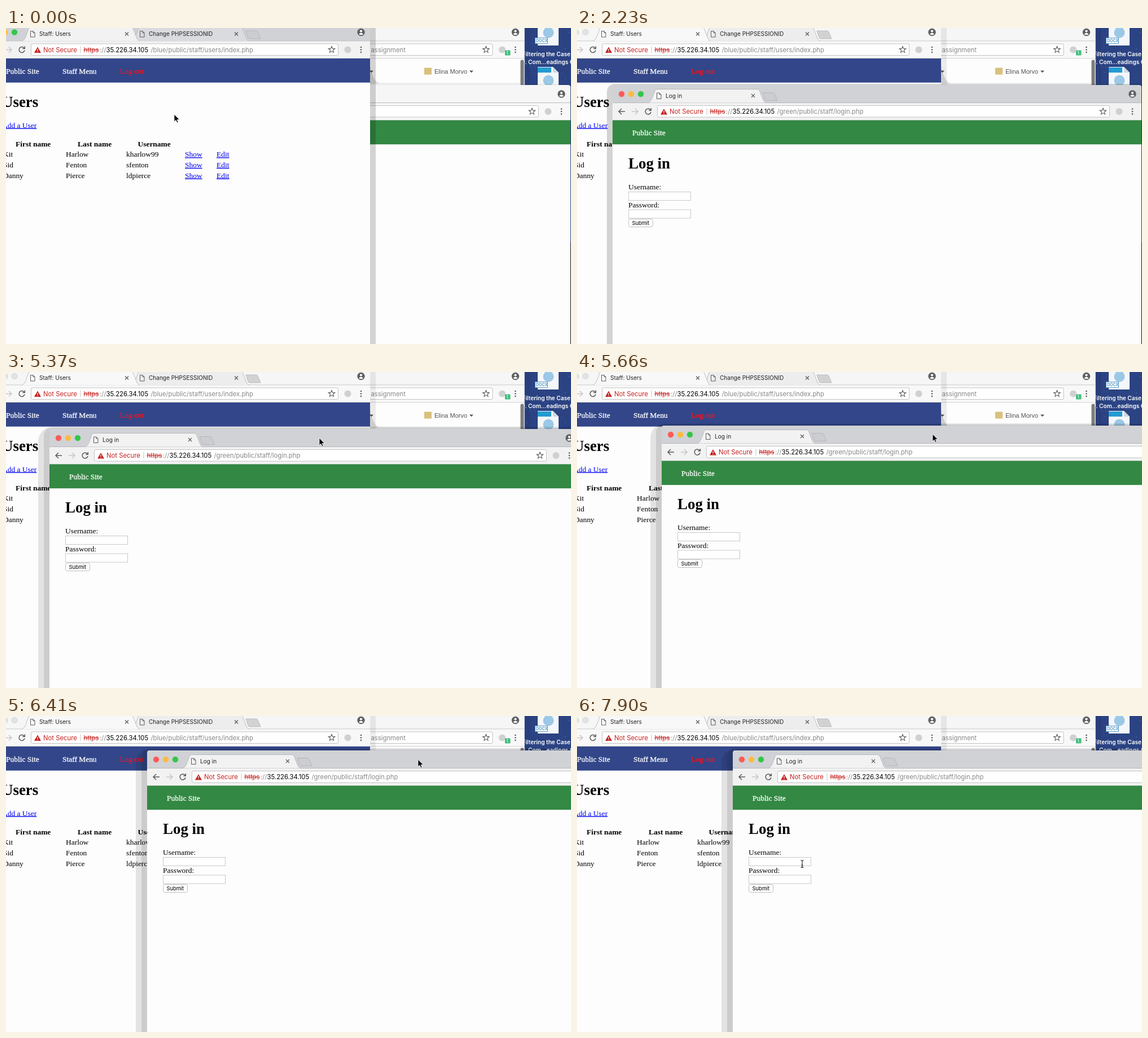
These frames come from a looping animation (1001x560 px, 8 s). An HTML page:

```html
<!DOCTYPE html>
<html lang="en">
<head>
<meta charset="utf-8">
<title>Log in</title>
<style>
html, body { margin: 0; width: 100%; height: 100%; overflow: hidden; }
#stage { position: relative; width: 1001px; height: 560px; overflow: hidden; background: #2b4383; }
svg { position: absolute; left: 0; top: 0; overflow: visible; }
text { white-space: pre; }
.ui { font: 11.3px Inter, sans-serif; }
.tab { font: 10.05px Inter, sans-serif; fill: #222; }
.page { font: 13.45px "Liberation Serif", serif; }
.head { font: bold 26.9px "Liberation Serif", serif; }
.th { font: bold 13.45px "Liberation Serif", serif; }
.nav { fill: #fff; stroke: #fff; stroke-width: .3px; }
.out { fill: #ff1018; stroke: #ff1018; }
.link { fill: #00e; text-decoration: underline; }
.btn { font: 9.3px Inter, sans-serif; }
.label { font: 600 10.1px Inter, sans-serif; fill: #fff; }
.account { font: 11px "Liberation Sans", sans-serif; fill: #555; }
.line { fill: none; stroke: #5a5a5a; stroke-width: 1.5; }
.dim { stroke: #c6c6c6; }
.grey { fill: #888; }
.red { fill: #c5221f; }
.strip { fill: #f6f6f6; }
.bar, .front { fill: #f8f8f8; }
.back { fill: #ededed; }
.edge { stroke: #b4b5b8; stroke-width: .9; }
.plus { fill: #d2d2d2; }
.light { fill: #e2e2e2; stroke: #cfcfcf; stroke-width: .7; }
.shade { fill: #000; opacity: .07; }
.wide { fill: #000; opacity: 0; }
.near { z-index: 2; }
.on { z-index: 3; }
.on .strip { fill: #d0d2d6; }
.on .bar, .on .front { fill: #f2f2f3; }
.on .back { fill: #dadbde; }
.on .plus { fill: #cbcdd0; }
.on .light { stroke: none; }
.on .l0 { fill: #fc5b57; }
.on .l1 { fill: #fdbb3f; }
.on .l2 { fill: #34c648; }
.on .shade { opacity: .17; }
.moved .shade { opacity: .1; }
.moved .wide { opacity: .1; }
#pointer { z-index: 4; }
</style>
</head>
<body>
<div id="stage"></div>
<script>
const stage = document.getElementById('stage');
const text = (x, y, s, cls) => `<text x="${x}" y="${y}" class="${cls}">${s}</text>`;
const rect = (x, y, w, h, attrs) => `<rect x="${x}" y="${y}" width="${w}" height="${h}" ${attrs}/>`;
const shape = (d, attrs) => `<path d="${d}" ${attrs}/>`;
const disc = (x, y, r, attrs) => `<circle cx="${x}" cy="${y}" r="${r}" ${attrs}/>`;
const at = (x, y, s) => `<g transform="translate(${x} ${y})">${s}</g>`;

function layer(body, cls = '') {
  const el = document.createElementNS('http://www.w3.org/2000/svg', 'svg');
  el.setAttribute('width', 1001);
  el.setAttribute('height', 560);
  el.setAttribute('class', cls);
  el.innerHTML = body;
  stage.append(el);
  return el;
}

const place = (el, x, y) => { el.style.transform = `translate(${x}px, ${y}px)`; };

function star(x, y) {
  let d = '';
  for (let i = 0; i < 10; i++) {
    const r = i % 2 ? 2.6 : 6, a = i * Math.PI / 5;
    d += `${i ? 'L' : 'M'}${(x + r * Math.sin(a)).toFixed(2)} ${(y - r * Math.cos(a)).toFixed(2)}`;
  }
  return shape(d + 'Z', 'class="line" style="stroke-width:1.1"');
}

function tab(x, title, cls) {
  return at(x, 0,
    shape('M-31 31.5C-26 30-25 27-19 10Q-17.5 7.5-15 7.5H162Q165 7.5 166.5 10C173 27 173 30 178 31.5', `class="edge ${cls}"`) +
    shape('M-15.5 14h4.5l3 3v7.5h-7.5zM-11 14v3h3', 'class="line" style="stroke-width:1"') +
    text(0, 22.7, title, 'tab') +
    shape('M152 16l6 6m0-6l-6 6', 'class="line" style="stroke-width:1.2"'));
}

function address(url) {
  return shape('M85 52.5l6-10.5 6 10.5z', 'class="red"') +
    shape('M91 45.5v3.5m0 1.1v1.2', 'stroke="#fff" stroke-width="1.2"') +
    text(101, 51, 'Not Secure', 'ui red') +
    rect(166.5, 41, 1, 12, 'fill="#c4c4c4"') +
    `<text y="51" class="ui"><tspan x="172.5" class="red" text-decoration="line-through">https</tspan>` +
    `<tspan x="201" class="grey">://</tspan><tspan x="212.5">35.226.34.105</tspan>` +
    `<tspan x="291.5" class="grey">${url}</tspan></text>`;
}

// Browser window drawn from its own top left corner.
function browser(w, tabs, url, page, cls) {
  const last = 94 + 194 * (tabs.length - 1);
  return layer(
    rect(-20, -4, w + 40, 700, 'rx="26" class="wide"') +
    rect(-10, -2, w + 20, 700, 'rx="14" class="shade"') +
    shape(`M0 640V4.5Q0 0 4.5 0H${w - 4.5}Q${w} 0 ${w} 4.5V640z`, 'fill="#fdfdfd"') +
    shape(`M0 32V4.5Q0 0 4.5 0H${w - 4.5}Q${w} 0 ${w} 4.5V32z`, 'class="strip"') +
    [16, 33, 50].map((x, i) => disc(x, 16, 5.2, `class="light l${i}"`)).join('') +
    shape(`M0 31.5H${w}`, 'class="edge"') +
    tabs.map((t, i) => tab(94 + 194 * i, t, i ? 'back' : 'front')).reverse().join('') +
    at(last + 170, 0, shape('M2 13.5H20Q22 13.5 23 15.5L28 27.5H9Q7 27.5 6 25.5z', 'class="edge plus"')) +
    disc(w - 16, 16, 6.7, 'fill="#5f6062"') +
    disc(w - 16, 14, 2.1, 'fill="#fff"') +
    shape(`M${w - 20} 19.5q4-5 8 0q-4 2.5-8 0`, 'fill="#fff"') +
    rect(0, 32, w, 30.5, 'class="bar"') +
    shape('M22 47H11M16 42l-5 5 5 5', 'class="line"') +
    shape('M34 47h11m-5-5l5 5-5 5', 'class="line dim"') +
    shape('M67.5 44.5a5 5 0 1 0 .5 3.5M68.3 41v4h-4', 'class="line"') +
    rect(79.5, 36.5, w - 136, 20.5, 'rx="2" fill="#fff" stroke="#c2c2c2"') +
    (url ? address(url) : '') +
    star(w - 68, 47) +
    disc(w - 39.5, 47, 6, 'fill="#cfd0d2"') +
    [42.5, 47, 51.5].map(y => disc(w - 16, y, 1.3, 'fill="#5a5a5a"')).join('') +
    rect(0, 62, w, .8, 'fill="#c8c8c8"') + page, cls);
}

function desktop() {
  let s = rect(918, 380, 83, 180, 'fill="#0b0d14"'), n = 7;
  const rnd = () => (n = n * 16807 % 2147483647) / 2147483647;
  for (let i = 0; i < 110; i++) {
    s += disc((918 + 83 * rnd()).toFixed(1), (330 * rnd()).toFixed(1), (.3 + .5 * rnd()).toFixed(2), 'fill="#8ea2d4" opacity=".6"');
  }
  const sheet = (y, h) => shape(`M942 ${y}h27l10 10v${h - 10}h-37z`, 'fill="#f4f7fa"') +
    shape(`M969 ${y}v10h10z`, 'fill="#cdd8e2"');
  return s + sheet(-16, 47) + disc(961, 8, 9.5, 'fill="#9cc8e6"') +
    rect(937.5, 17.5, 22, 10, 'fill="#fff" stroke="#5b9fca"') +
    `<text x="939" y="25.3" font-family="Inter, sans-serif" font-weight="600" font-size="7" fill="#4690c0">DOCX</text>` +
    text(914.5, 50, 'Filtering the Case', 'label') +
    text(914, 63.5, 'y. Com...eadings Q', 'label') +
    sheet(69, 47) + rect(942, 70, 24, 9, 'fill="#239bd3"') + disc(961, 93, 9.5, 'fill="#9cc8e6"');
}

const nav = (w, color) => rect(0, 62.5, w, 42.7, `fill="${color}"`) + text(35, 89, 'Public Site', 'page nav');
const caret = x => shape(`M${x} 84h7l-3.5 3.7z`, 'fill="#555"');

function userPage() {
  const rows = [['Kit', 'Harlow', 'kharlow99'], ['Sid', 'Fenton', 'sfenton'], ['Danny', 'Pierce', 'ldpierce']];
  const cols = [30, 141, 248, 352, 408];
  return nav(680, '#324689') +
    text(135, 89, 'Staff Menu', 'page nav') + text(237, 89, 'Log out', 'page nav out') +
    text(28, 148, 'Users', 'head') + text(28, 185, 'Add a User', 'page link') +
    text(52, 218, 'First name', 'th') + text(162, 218, 'Last name', 'th') + text(268.5, 218, 'Username', 'th') +
    rows.map((row, r) => [...row, 'Show', 'Edit'].map((s, c) =>
      text(cols[c], 236.7 + 18.7 * r, s, c > 2 ? 'page link' : 'page')).join('')).join('');
}

function loginPage() {
  const field = (y, name) => text(28, y, name, 'page') +
    rect(28.5, y + 4.5, 110, 15, 'fill="#fff" stroke="#c9c9c9"');
  return nav(937, '#338843') + text(28, 148, 'Log in', 'head') +
    field(185, 'Username:') + field(216.5, 'Password:') +
    rect(28.5, 237.5, 43, 14, 'rx="3" fill="#fff" stroke="#bdbdbd"') + text(34.5, 248, 'Submit', 'btn');
}

const coursePage =
  text(446.5, 51, 'assignment', 'ui grey') +
  rect(684, 48, 9.5, 9, 'rx="1" fill="#3fbf7f"') +
  `<text x="686.5" y="55.5" font-family="Inter, sans-serif" font-size="8" fill="#fff">1</text>` +
  caret(444) + rect(541, 79, 13, 12, 'fill="#d9c07c"') +
  text(559, 89, 'Elina Morvo', 'account') + caret(621) +
  rect(0, 106, 711, 1, 'fill="#e4e4e4"') + rect(711, 63, 7.5, 60, 'fill="#f4f4f4"') +
  rect(711.5, 65, 6, 80, 'rx="3" fill="#7d7d7d"') +
  shape('M444 68q4 32 17 39h-17z', 'opacity=".13"');

layer(desktop());
const course = browser(718.5, ['Course'], '', coursePage, '');
const users = browser(680, ['Staff: Users', 'Change PHPSESSIONID'], '/blue/public/staff/users/index.php', userPage());
const login = browser(937, ['Log in'], '/green/public/staff/login.php', loginPage());
const pointer = layer(
  shape('M0 0V13L3 10.3 5 14.7 7 13.8 5.1 9.5H9.2z', 'id="arrow" stroke="#fff" stroke-width=".8"') +
  shape('M-2.5-6.5q2.5 0 2.5 2v9q0 2-2.5 2M2.5-6.5q-2.5 0-2.5 2v9q0 2 2.5 2M-1.5 2h3', 'id="beam" fill="none" stroke="#222" stroke-width="1.1"'));
pointer.id = 'pointer';
const arrow = document.getElementById('arrow'), beam = document.getElementById('beam');
place(course, 200, -8.5);
place(users, -35, -8.5);

// Step number, x, y.
const mouse = [[0, 298, 153], [3, 196, 222], [6, 412, 340], [7, 405, 345], [8, 405, 345], [10, 827, 466],
  [16, 827, 466], [17, 760, 470], [22, 300, 474], [24, 157, 440], [29, 419, 216], [30, 440, 203], [33, 541, 117],
  [35, 541, 117], [36, 555, 117], [38, 630, 110], [41, 652, 92], [43, 730, 77], [45, 747, 79], [49, 742, 81],
  [50, 742, 81], [53, 399, 262]];
const drag = [[0, 63, 101], [35, 63, 101], [36, 77, 101], [38, 150, 95], [41, 173, 77], [43, 250, 61],
  [45, 263, 64], [49, 276, 61]];

function along(keys, k) {
  const i = keys.findIndex(p => p[0] > k);
  if (i < 0) return keys[keys.length - 1].slice(1);
  const [a, b] = [keys[i - 1], keys[i]], f = (k - a[0]) / (b[0] - a[0]);
  return [1, 2].map(n => Math.round(a[n] + (b[n] - a[n]) * f));
}

let shown = -1;
function draw(now) {
  const k = Math.floor((now % 8000 + 12) / 149);
  if (k !== shown) {
    shown = k;
    const raised = k >= 15;
    users.setAttribute('class', raised ? 'near' : 'on');
    login.setAttribute('class', !raised ? 'near' : k < 36 ? 'on' : 'on moved');
    place(login, ...along(drag, k));
    place(pointer, ...along(mouse, k));
    pointer.style.display = k >= 12 && k < 17 ? 'none' : '';
    arrow.style.display = k < 53 ? '' : 'none';
    beam.style.display = k < 53 ? 'none' : '';
  }
  requestAnimationFrame(() => draw(performance.now() - start));
}
const start = performance.now();
draw(0);
</script>
</body>
</html>
```
